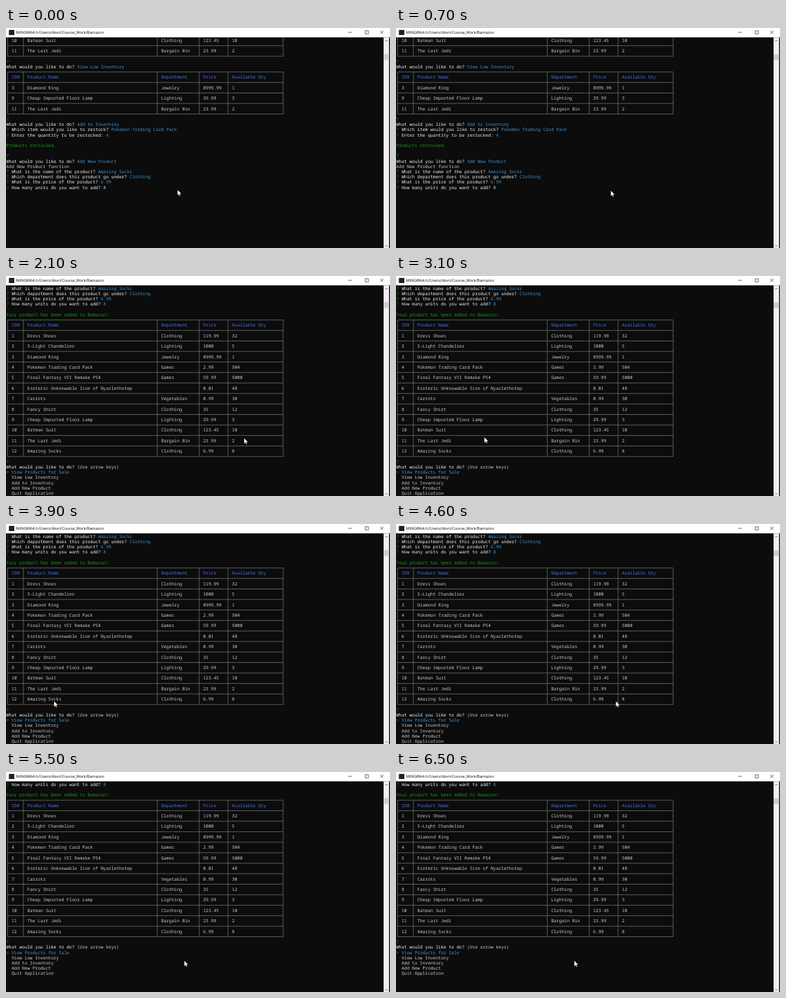
Animation of 600 by 344 pixels, one loop 6600 ms. Source, as an HTML page:

```html
<!DOCTYPE html>
<html lang="en">
<head>
<meta charset="utf-8">
<title>Terminal</title>
<style>
  html, body { margin: 0; height: 100%; overflow: hidden; background: #0c0c0c; }
  svg { display: block; width: 100vw; height: 100vh; }
  text { white-space: pre; text-rendering: geometricPrecision; }
  .term { font: 6.833px "Noto Sans Mono", monospace; fill: #ccc; }
  .white { fill: #f2f2f2; }
  .green { fill: #13a10e; }
  .cyan { fill: #3a96dd; }
  .blue { fill: #3b78ff; }
  .grid { fill: none; stroke: #767676; stroke-width: .8; }
  .title { font: 6px "Open Sans", sans-serif; fill: #000; }
  .icon { fill: none; stroke: #222; stroke-width: .7; }
</style>
</head>
<body>
<svg viewBox="0 0 600 344">
  <rect width="600" height="344" fill="#0c0c0c"/>
  <g class="term" id="before"></g>
  <g class="term" id="after"></g>
  <rect id="caret" x="156.3" y="251" width="4.1" height="1.1" fill="#e8e8e8"/>

  <rect width="600" height="14.6" fill="#fff"/>
  <rect x="4.5" y="3" width="8.5" height="8" fill="#222"/>
  <text class="title" x="15.8" y="9.3">MINGW64:/c/Users/dovri/Course_Work/Bamazon</text>
  <path class="icon" d="M535 6.8h5.4M561.2 4.2h5v5h-5zM584.8 4.2l5 5m0-5l-5 5"/>

  <rect x="590" y="14.6" width="8.6" height="330" fill="#f0f0f0"/>
  <rect x="590.3" y="41.3" width="8" height="8.4" fill="#cdcdcd"/>
  <path class="icon" d="M592.6 20.8l1.8-1.8 1.8 1.8M592.6 339.8l1.8 1.8 1.8-1.8"/>

  <path id="mouse" d="M0 0V8.7L2 6.9 3.3 9.8 4.7 9.2 3.4 6.3H6.2Z" fill="#fff" stroke="#000" stroke-width=".3"/>
</svg>
<script>
const CELL_W = 4.1, CELL_H = 8.21, LEFT = 0.5, TOP = 15.4;
const LOOP = 6600, STEP = 100, SUBMIT = 1500, SCROLL = 5500;
const $ = id => document.getElementById(id);
const colX = col => LEFT + col * CELL_W;
const midX = col => colX(col + 0.5);
const midY = row => TOP + (row + 0.5) * CELL_H;

const span = (color, text) => `<tspan class="${color}">${text}</tspan>`;
const write = (row, content, col = 0) =>
  `<text x="${colX(col)}" y="${midY(row) + 2.3}">${content}</text>`;
const ask = (row, question, answer) =>
  write(row, span('green', '? ') + span('white', question + ' ') + answer);
const menu = (row, answer) =>
  write(row, span('green', '?')) +
  write(row + 1, span('white', 'What would you like to do? ') + answer);
const cyan = text => span('cyan', text);
const green = text => span('green', text);

const TEXT_COLS = [2, 8, 59, 75, 86];
const RULE_COLS = [0, 6, 57, 73, 84, 105];
const HEADER = 'ID#|Product Name|Department|Price|Available Qty';
const PRODUCTS = [
  'Dress Shoes|Clothing|119.99|32',
  '5-Light Chandelier|Lighting|1000|5',
  'Diamond Ring|Jewelry|8999.99|1',
  'Pokemon Trading Card Pack|Games|2.99|504',
  'Final Fantasy VII Remake PS4|Games|59.99|5000',
  'Esoteric Unknowable Icon of Nyarlethotep||0.01|48',
  'Carrots|Vegetables|0.99|30',
  'Fancy Shirt|Clothing|35|12',
  'Cheap Imported Floor Lamp|Lighting|29.99|3',
  'Batman Suit|Clothing|123.45|10',
  'The Last Jedi|Bargain Bin|23.99|2',
  'Amazing Socks|Clothing|6.99|8'
].map((product, i) => `${i + 1}|${product}`);
const pick = (...ids) => ids.map(id => PRODUCTS[id - 1]);

function table(row, lines) {
  const bottom = row + 2 * lines.length;
  let rules = '', cells = '';
  for (let r = row; r <= bottom; r += 2) rules += `M${midX(0)} ${midY(r)}H${midX(105)}`;
  for (const col of RULE_COLS) rules += `M${midX(col)} ${midY(row)}V${midY(bottom)}`;
  lines.forEach((line, i) => line.split('|').forEach((cell, j) => {
    const content = line === HEADER ? span('blue', cell) : cell;
    cells += write(row + 1 + 2 * i, content, TEXT_COLS[j]);
  }));
  return `<path class="grid" d="${rules}"/>` + cells;
}

const newProduct = (row, units) =>
  ask(row, 'What is the name of the product?', cyan('Amazing Socks')) +
  ask(row + 1, 'Which department does this product go under?', cyan('Clothing')) +
  ask(row + 2, 'What is the price of the product?', cyan('6.99')) +
  ask(row + 3, 'How many units do you want to add?', units);

$('before').innerHTML =
  table(-1, pick(10, 11)) +
  menu(4, cyan('View Low Inventory')) +
  table(6, [HEADER, ...pick(3, 9, 11)]) +
  menu(15, cyan('Add to Inventory')) +
  ask(17, 'Which item would you like to restock?', cyan('Pokemon Trading Card Pack')) +
  ask(18, 'Enter the quantity to be restocked:', cyan('4')) +
  write(20, green('Products restocked.')) +
  menu(22, cyan('Add New Product')) +
  write(24, 'Add New Product function') +
  newProduct(25, '8');

$('after').innerHTML =
  newProduct(0, cyan('8')) +
  write(5, green('Your product has been added to Bamazon!')) +
  table(6, [HEADER, ...PRODUCTS]) +
  menu(33, '(Use arrow keys)') +
  write(35, cyan('&gt; View Products for Sale')) +
  ['View Low Inventory', 'Add to Inventory', 'Add New Product', 'Quit Application']
    .map((item, i) => write(36 + i, item, 2)).join('');

// Pointer path: time, x, y
const PATH = [
  [0, 268, 253], [300, 268, 253], [1000, 379.5, 255], [1400, 379.5, 255],
  [1800, 372, 253.5], [2400, 372, 253.5], [3100, 138, 252], [3500, 40, 281],
  [3800, 66, 277], [3900, 75, 277], [4500, 335, 277], [4700, 352, 277],
  [4800, 352, 277], [5300, 279, 296], [5400, 279, 296], [5500, 278.5, 295], [LOOP, 278.5, 295]
];
const ease = p => p * p * (3 - 2 * p);

function pointer(t) {
  const i = PATH.findIndex(key => key[0] > t);
  const [t0, x0, y0] = PATH[i - 1], [t1, x1, y1] = PATH[i];
  const p = ease((t - t0) / (t1 - t0));
  return [x0 + (x1 - x0) * p, y0 + (y1 - y0) * p];
}

const show = (id, visible) => $(id).setAttribute('visibility', visible ? 'visible' : 'hidden');

function draw(now) {
  const t = Math.floor(now % LOOP / STEP) * STEP;
  const submitted = t >= SUBMIT;
  show('before', !submitted);
  show('after', submitted);
  show('caret', !submitted && t >= 100 && (t - 100) % 1000 < 500);
  $('after').setAttribute('transform', `translate(0 ${t >= SCROLL ? -3 * CELL_H : 0})`);
  $('mouse').setAttribute('transform', `translate(${pointer(t)})`);
}

const start = performance.now();
function tick() {
  draw(performance.now() - start);
  requestAnimationFrame(tick);
}
tick();
</script>
</body>
</html>
```
